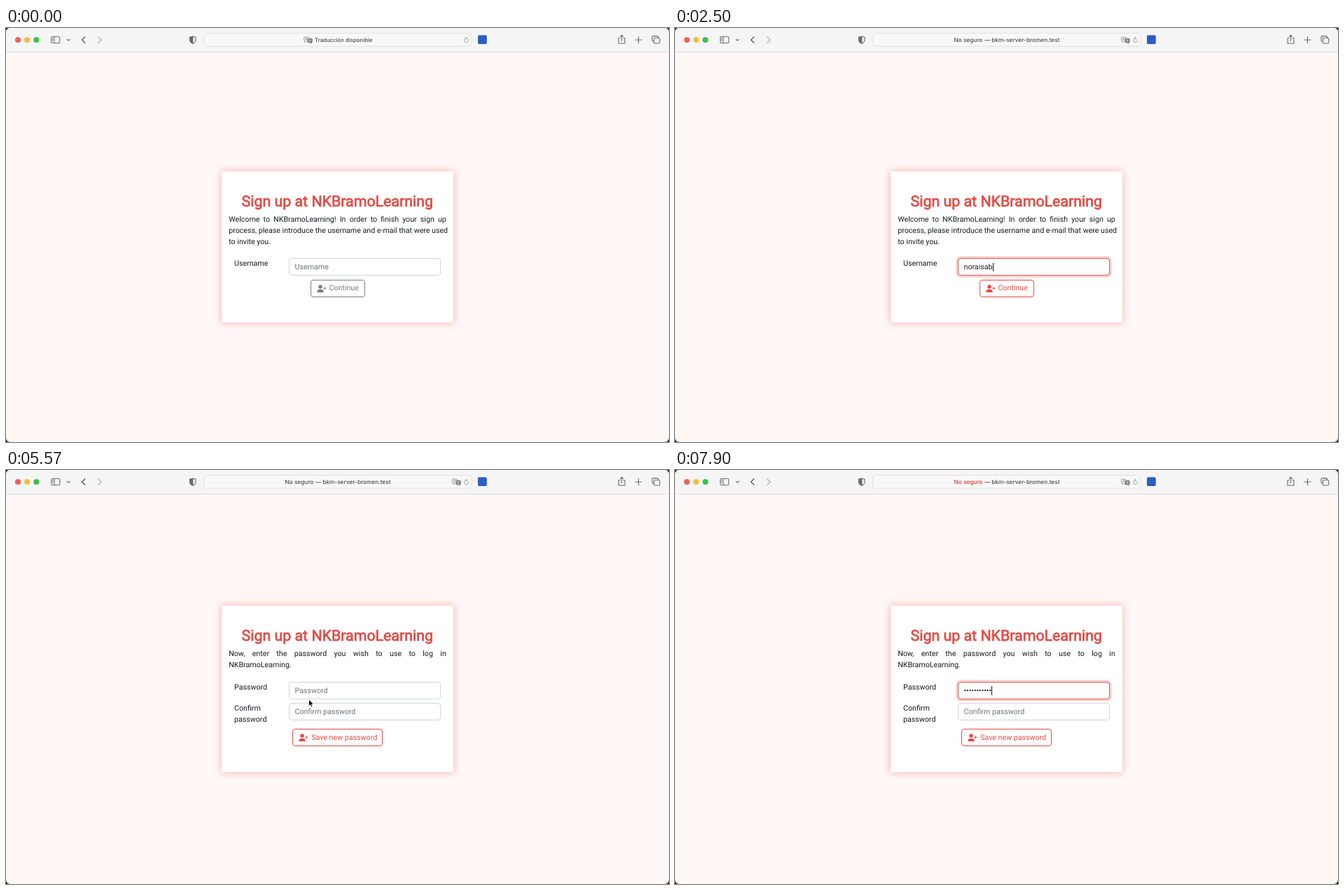
Write an HTML page that moves like this. It is 947 by 592 pixels and loops after 8 s.

```html
<!DOCTYPE html>
<html lang="en">
<head>
<meta charset="utf-8">
<title>Sign up</title>
<style>
  html, body { margin: 0; width: 100%; height: 100%; overflow: hidden; background: #2a2626; }
  #win { position: absolute; left: 0; top: 0; width: 947px; height: 592px; overflow: hidden;
    border-radius: 6px; background: #fff8f7; --red: #e34b44; text-rendering: geometricPrecision;
    font: 10.667px/16px Roboto, sans-serif; color: #17191b; }
  :where(#win div, #win svg) { position: absolute; left: 0; top: 0; box-sizing: border-box; white-space: nowrap; }
  #bar { width: 947px; height: 35px; background: #f6f5f5; border-bottom: 1px solid #dedcdc; }
  .addr { font: 500 8.25px/12px Inter, sans-serif; color: #4b4b4b; top: 11px; }
  .card { left: 307.5px; width: 331.5px; background: #fff; box-shadow: 0 0 10px 1px rgba(240, 80, 75, .38); }
  .card h1 { position: absolute; margin: 0; left: 0; width: 100%; top: 31px; text-align: center;
    font-size: 21.333px; line-height: 25.6px; font-weight: 400; color: var(--red);
    -webkit-text-stroke: .75px var(--red); }
  .line { left: 10.7px; width: 310.6px; }
  .just { text-align-last: justify; }
  .label { left: 18.5px; white-space: pre; }
  .input, .ring { left: 96px; width: 217.3px; height: 25px; border: 1px solid #d0d4d9; border-radius: 4px; }
  .input { padding: 4px 0 0 8px; background: #fff; }
  .ring { border-color: #df5952; box-shadow: 0 0 0 2.7px rgba(229, 72, 63, .25); opacity: 0; }
  .hint { color: #6c7177; }
  .caret { display: inline-block; width: .8px; height: 12.5px; margin-right: -.8px;
    vertical-align: -2.7px; background: #111; }
  .btn { height: 25px; border: 1px solid; border-radius: 4px; color: var(--red); }
  .btn svg { left: 8px; top: 6px; }
  .btn span { position: absolute; left: 26px; top: 3.6px; }
</style>
</head>
<body>
<div id="win">
  <div id="bar">
    <svg width="947" height="34" fill="none" stroke="#6b6b6b" stroke-width="1.1" stroke-linecap="round" stroke-linejoin="round">
      <g stroke="none">
        <circle cx="17" cy="17" r="4.1" fill="#ee6157"/>
        <circle cx="30.2" cy="17" r="4.1" fill="#f5bd3e"/>
        <circle cx="43.4" cy="17" r="4.1" fill="#3ac148"/>
      </g>
      <rect x="64.8" y="12.3" width="12" height="9.2" rx="1.6"/>
      <path d="M69.2 12.5V21.3M66.3 14.6h1.4M66.3 16.4h1.4M66.3 18.2h1.4" stroke-width=".9"/>
      <path d="M87.3 16.2l2 2 2-2"/>
      <path d="M112.8 12.8l-4.3 4.2 4.3 4.2" stroke="#555" stroke-width="1.3"/>
      <path d="M131.8 12.8l4.3 4.2-4.3 4.2" stroke="#b3b1b1" stroke-width="1.3"/>
      <path d="M266.8 12.1q2 .9 4.2 1v4.2q0 3-4.2 4.9q-4.2-1.9-4.2-4.9v-4.2q2.2-.1 4.2-1z"/>
      <path d="M266.8 12.1v10.1q-4.2-1.9-4.2-4.9v-4.2q2.2-.1 4.2-1z" fill="#6b6b6b"/>
      <rect x="282.5" y="7.5" width="382.5" height="18.5" rx="4.5" fill="#f9f8f8" stroke="#e2e0e0" stroke-width="1"/>
      <path d="M660.3 16.2a3.1 3.1 0 1 1-2-1.6M656.9 13l1.7 1.5-1.5 1.7" stroke="#8a8a8a" stroke-width=".8"/>
      <rect x="674" y="10.3" width="12.8" height="12.8" rx="2" fill="#2c5fc5" stroke="none"/>
      <path d="M877 14.5h-2v7.5h9v-7.5h-2M879.5 18.5v-8M877.4 12.3l2.1-2.1 2.1 2.1"/>
      <path d="M903.5 12.6v8.8M899.1 17h8.8" stroke-width="1.2"/>
      <rect x="925.5" y="14.3" width="8.3" height="7.7" rx="1.5"/>
      <path d="M925.3 19.3h-.8q-1.5 0-1.5-1.5v-4.7q0-1.5 1.5-1.5h5.6q1.5 0 1.5 1.5v1"/>
    </svg>
    <svg id="lang" width="13" height="11" style="top:11.5px" fill="none" stroke="#808080" stroke-width=".8">
      <path d="M1.5 1h4.5q1 0 1 1v4q0 1-1 1H3.5L2 8.5V7q-1.3 0-1.3-1V2q0-1 .8-1zM2.5 5.5L3.9 2.3l1.4 3.2"/>
      <path d="M7 3h4q1.3 0 1.3 1v4q0 1-1.3 1v1.3L9.5 9H7Q6 9 6 8V4q0-1 1-1z" fill="#808080"/>
      <path d="M7.6 5h3.2M8 7.7l2.2-2.5M8.2 5.5l2.2 2.2" stroke="#f4f4f4" stroke-width=".6"/>
    </svg>
    <div class="addr" id="offer" style="left:441px;font-size:7.8px">Traducción disponible</div>
    <div id="site">
      <div class="addr" style="left:398.5px" id="warn">No seguro</div>
      <div class="addr" style="left:442px">—</div>
      <div class="addr" style="left:452.3px">bkm-server-bromen.test</div>
    </div>
  </div>

  <div class="card" id="signup" style="top:205px;height:216px">
    <h1>Sign up at NKBramoLearning</h1>
    <div class="line just" style="top:61px">Welcome to NKBramoLearning! In order to finish your sign up</div>
    <div class="line just" style="top:77px">process, please introduce the username and e-mail that were used</div>
    <div class="line" style="top:93px">to invite you.</div>
    <div class="label" style="top:124.3px">Username</div>
    <div class="input" id="user" style="top:124.4px"></div>
    <div class="ring" id="userRing" style="top:124.4px"></div>
    <div class="btn" id="next" style="left:127px;top:154.8px;width:78px"><span>Continue</span></div>
  </div>

  <div class="card" id="secret" style="top:194.3px;height:238px">
    <h1>Sign up at NKBramoLearning</h1>
    <div class="line just" style="top:61px">Now, enter the password you wish to use to log in</div>
    <div class="line" style="top:77px">NKBramoLearning.</div>
    <div class="label" style="top:108.5px">Password</div>
    <div class="input" id="pass" style="top:108.7px"></div>
    <div class="ring" id="passRing" style="top:108.7px"></div>
    <div class="label" style="top:139px">Confirm
password</div>
    <div class="input hint" style="top:139px">Confirm password</div>
    <div class="btn" style="left:101.7px;top:176.2px;width:129px"><span>Save new password</span></div>
  </div>

  <svg id="mouse" width="10" height="15">
    <path d="M1 .8v9.7l2.2-2 1.5 3.5 1.7-.7-1.5-3.4h3z" fill="#000" stroke="#fff" stroke-width=".8"/>
  </svg>
</div>

<script>
const LOOP = 8000, BLINK = 530;
const NAME = "noraisabea.blina";
const nameKeys = [1700, 1800, 1900, 2000, 2130, 2230, 2330, 2500, 2570, 2670, 2970, 3670, 3870, 3970, 4030, 4100];
const passKeys = [6600, 6670, 6770, 6830, 6970, 7070, 7170, 7270, 7370, 7470, 7900];
// each visit of the pointer: when it shows, and its stops as time, x, y
const visits = [
  { from: 500, to: 1700, stops: [[500, 474, -8], [1090, 436.5, 341.5]] },
  { from: 5300, to: 6600, stops: [[5300, 434, 334], [5570, 432.5, 328], [5930, 432.5, 328], [6130, 432, 324.5]] }
];

const $ = id => document.getElementById(id);
const fade = (t, a, b) => Math.min(1, Math.max(0, (t - a) / (b - a)));
const ease = k => k * k * (3 - 2 * k);
const mix = (a, b, k) => a + (b - a) * k;

for (const b of document.querySelectorAll(".btn")) {
  b.insertAdjacentHTML("beforeend", `<svg width="14" height="12" fill="currentColor">
    <circle cx="5" cy="3" r="2.7"/><path d="M.3 11q0-4.3 3.700-4.3h2q3.7 0 3.7 4.3z"/>
    <path d="M11.3 3.2v4M9.3 5.2h4" stroke="currentColor" stroke-width="1.1"/></svg>`);
}

function field(id, hint) {
  const el = $(id);
  el.innerHTML = `<span></span><i class="caret"></i><span class="hint">${hint}</span>`;
  const [text, caret, ghost] = el.children;
  return (value, caretOn) => {
    if (text.textContent !== value) text.textContent = value;
    caret.style.visibility = caretOn ? "visible" : "hidden";
    ghost.style.display = value ? "none" : "";
  };
}
const drawUser = field("user", "Username");
const drawPass = field("pass", "Password");

const typed = (t, keys) => keys.filter(k => k <= t).length;
function caretOn(t, focus, keys) {
  const n = typed(t, keys), since = t - (n ? keys[n - 1] : focus);
  return since >= 0 && since % (2 * BLINK) < BLINK;
}

function drawMouse(t) {
  const visit = visits.find(v => t >= v.from && t < v.to);
  $("mouse").style.display = visit ? "" : "none";
  if (!visit) return;
  const i = visit.stops.findLastIndex(s => s[0] <= t);
  const a = visit.stops[i], b = visit.stops[i + 1] || a;
  const k = a === b ? 0 : ease(fade(t, a[0], b[0]));
  $("mouse").style.transform = `translate(${mix(a[1], b[1], k) - 1}px, ${mix(a[2], b[2], k) - .8}px)`;
}

function draw(t) {
  const swap = ease(fade(t, 1150, 1300));
  $("offer").style.opacity = 1 - swap;
  $("site").style.opacity = swap;
  $("lang").style.left = mix(424.5, 637, swap) + "px";
  $("warn").style.color = t >= 6130 ? "#d93a35" : "";

  const second = t >= 4300;
  $("signup").style.display = second ? "none" : "";
  $("secret").style.display = second ? "" : "none";

  drawUser(NAME.slice(0, typed(t, nameKeys)), caretOn(t, 1300, nameKeys));
  $("userRing").style.opacity = fade(t, 1230, 1370);
  const on = fade(t, 1700, 1850);
  $("next").style.color = `rgb(${mix(122, 227, on)}, ${mix(124, 75, on)}, ${mix(127, 68, on)})`;

  drawPass("•".repeat(typed(t, passKeys)), caretOn(t, 6130, passKeys));
  $("passRing").style.opacity = fade(t, 6130, 6270);
  drawMouse(t);
}

function tick() {
  draw(performance.now() % LOOP);
  requestAnimationFrame(tick);
}
tick();
</script>
</body>
</html>
```
